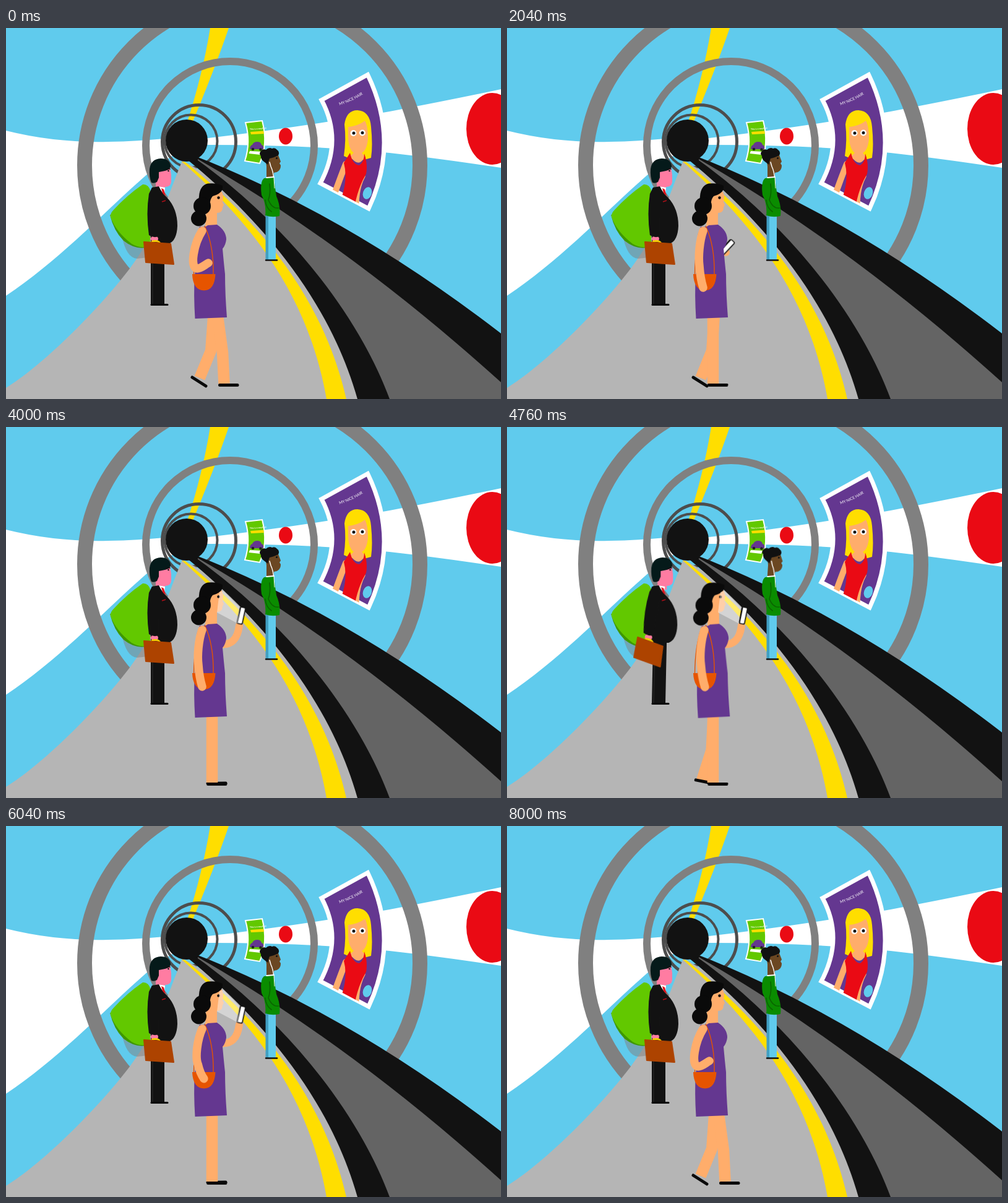
These frames come from a looping animation (800x600 px, 8040 ms). An HTML page:

```html
<!DOCTYPE html>
<html lang="en">
<head>
<meta charset="utf-8">
<title>Waiting on the platform</title>
<style>
  html, body { margin: 0; width: 100%; height: 100%; overflow: hidden; background: #60cbed; }
  svg { display: block; width: 800px; height: 600px; }

  .line { fill: none; stroke-linecap: round; stroke-linejoin: round; }
  .skin { stroke: #ffad6b; }
  .shoe { stroke: #0a0a0a; stroke-width: 5px; }

  /* Idle sway: four full swings per loop */
  .sway { animation: 1005ms cubic-bezier(.455, .03, .515, .955) infinite alternate; }
  .man-head { animation-name: man-head; }
  .man-body { animation-name: man-body; }
  .man-legs { animation-name: man-legs; transform-origin: 245px 447px; }
  .man-arm { animation-name: man-arm; transform-origin: 242px 262px; }
  .man-case { animation-name: man-case; transform-origin: 241px 343px; }
  .lady { animation-name: lady; transform-origin: 330px 250px; }
  .nod { animation-name: nod; animation-duration: 502.5ms; transform-origin: 427px 238px; }
  @keyframes man-head { to { transform: translate(1.5px, 0); } }
  @keyframes man-body { to { transform: translate(-2px, 0); } }
  @keyframes man-legs { to { transform: skewX(-1.4deg); } }
  @keyframes man-arm { to { transform: rotate(9.5deg); } }
  @keyframes man-case { to { transform: rotate(9deg); } }
  @keyframes lady { to { transform: translate(1.5px, .5px) rotate(-.6deg); } }
  @keyframes nod { to { transform: rotate(7deg); } }

  /* One-off actions across the whole loop */
  .act { animation: 8040ms cubic-bezier(.455, .03, .515, .955) infinite; }
  .front-leg { animation-name: front-leg; }
  .front-foot { animation-name: front-foot; }
  .back-leg { animation-name: back-leg; }
  .back-foot { animation-name: back-foot; }
  .near-arm { animation-name: near-arm; }
  .far-arm { animation-name: far-arm; }
  .phone { animation-name: phone; }
  .glow { animation-name: glow; }
  @keyframes front-leg {
    0%, 21%, 93%, 100% { d: path("M342 466 L350 525 L352.5 575"); }
    25%, 85% { d: path("M333 466 L333 525 L333 575"); }
  }
  @keyframes front-foot {
    0%, 21%, 93%, 100% { transform: translate(0, 0); }
    25%, 85% { transform: translate(-19px, -.5px); }
  }
  @keyframes back-leg {
    0%, 25%, 83.3%, 100% { d: path("M335 466 L331 522 L313 566"); }
    37.5%, 50%, 75% { d: path("M333 466 L333 525 L333 575"); }
    62.5% { d: path("M333.5 466 L330 522 L312 571"); }
  }
  @keyframes back-foot {
    0%, 25%, 83.3%, 100% { d: path("M301 565 L323 579"); }
    37.5%, 50%, 75% { d: path("M326 576.5 L355 576"); }
    62.5% { d: path("M302 570 L320 574.5"); }
  }
  @keyframes near-arm {
    0%, 12.5%, 84%, 100% { d: path("M317 328 C304 348 296 388 309 389 C315 389 320 384 327 380"); }
    25%, 70% { d: path("M317 328 C311 345 309 370 311 385 C312 400 314 410 317 420"); }
  }
  @keyframes far-arm {
    0%, 18%, 89.5%, 100% { d: path("M335 345 Q336 370 336 395"); }
    34.2%, 76% { d: path("M345 351 Q373 355 377 321"); }
  }
  @keyframes phone {
    0%, 18%, 89.5%, 100% { transform: translate(337px, 392px) rotate(67deg); }
    34.2%, 76% { transform: translate(380px, 305px) rotate(12deg); }
  }
  @keyframes glow {
    0%, 33%, 77.5%, 100% { opacity: 0; }
    36%, 75.8% { opacity: .42; }
  }
</style>
</head>
<body>
<svg viewBox="0 0 800 600">
  <!-- Walls and ceiling -->
  <rect width="800" height="600" fill="#60cbed"/>
  <path fill="#fff" d="M0 166 Q80 186 165 184 Q220 183 265 178 L285 200 C230 215 125 350 0 433Z"/>
  <path fill="#fff" d="M310 180 Q480 160 620 135 Q720 116 800 99 V226 Q700 211 620 202 Q480 188 310 189Z"/>
  <path fill="#ffde00" d="M330 0 H360 Q336 70 299 158 H291 Q318 75 330 0Z"/>
  <g fill="none" stroke="#808080">
    <circle cx="398" cy="222" r="271" stroke-width="24"/>
    <circle cx="362" cy="190" r="136" stroke-width="12"/>
    <circle cx="312" cy="184" r="59.5" stroke="#4d4d4d" stroke-width="5"/>
    <circle cx="299" cy="183" r="42.5" stroke="#4d4d4d" stroke-width="4"/>
  </g>

  <!-- Platform and track -->
  <path fill="#b5b5b5" d="M285 214 C262 270 246 328 200 389 C150 455 60 545 0 582 V600 H580 L540 480 L400 280Z"/>
  <path fill="#ffde00" d="M284 216 C393 312 488 428 518 600 H550 C510 425 398 305 290 217Z"/>
  <path fill="#121212" d="M292 205 H300 Q550 301 800 494 V600 H568 C520 430 400 300 292 212Z"/>
  <path fill="#646464" d="M310 212 Q555 352 800 573 V600 H620 C560 440 430 300 310 214Z"/>
  <circle cx="292" cy="182" r="34" fill="#121212"/>

  <!-- Bench -->
  <path fill="#808080" fill-opacity=".5" d="M187 335 Q194 372 212 373 L230 371 V345Z"/>
  <path fill="#3f9800" d="M168 302 Q174 328 190 344 Q210 360 231 354 V340Z"/>
  <path fill="#62c800" d="M221 253 Q229 252 233 262 V352 Q218 358 203 349 Q178 330 169 306 Q168 300 174 294 Q196 270 221 253Z"/>

  <!-- Station signs -->
  <ellipse cx="452" cy="175" rx="11" ry="13.5" fill="#ea0a14"/>
  <ellipse cx="786" cy="163" rx="42" ry="58" fill="#ea0a14"/>

  <!-- Small poster -->
  <path fill="#62c800" stroke="#fff" stroke-width="2" d="M387 153 L414 150 Q424 188 410 219 L386 215 Q396 184 387 153Z"/>
  <text x="394" y="165" font-size="3.6" font-weight="700" font-family="Lato, sans-serif" fill="#fff" transform="rotate(-4 394 165)">This is a small ad</text>
  <path fill="#ffde00" d="M395 168 L416 166.5 L417 171 L396 172Z"/>
  <path fill="#643790" d="M394 196 Q394 190 398 189 Q400 184 406 184 Q412 184 413 189 Q417 190 416 196Z"/>
  <circle cx="399" cy="196" r="2.3" fill="#222"/><circle cx="411.5" cy="196.5" r="2.3" fill="#222"/>
  <path fill="#fff" d="M394 199 L413 200 L411 205 L392.5 203Z"/>

  <!-- Large poster -->
  <clipPath id="poster"><path d="M510 116.5 L584.5 75.5 Q637 184 586 292 L508 251 Q545 182 510 116.5Z"/></clipPath>
  <path fill="#643790" stroke="#fff" stroke-width="7" d="M510 116.5 L584.5 75.5 Q637 184 586 292 L508 251 Q545 182 510 116.5Z"/>
  <g clip-path="url(#poster)">
    <path fill="#ffde00" d="M546 207 Q550 180 547 156 Q550 133 568 133 Q588 134 590 160 Q593 190 590 210 Q568 218 546 207Z"/>
    <path class="line skin" stroke-width="10" d="M549 220 Q541 240 531 268"/>
    <path class="line skin" stroke-width="7" d="M577 240 Q568 256 567 285"/>
    <path fill="#ffad6b" d="M553 160 Q570 158 580 150 Q585 158 585 180 Q583 198 575 202 L580 208 Q570 228 556 207 L562 202 Q553 195 553 175Z"/>
    <path fill="#ea0a14" d="M556 202 Q560 221 571 222 Q579 217 579 203 Q585 220 582 236 Q570 256 564 285 H538 Q554 248 546 218Z"/>
    <g fill="#fff"><circle cx="561.5" cy="170" r="5"/><circle cx="576" cy="169.5" r="5"/></g>
    <g fill="#111"><circle cx="562" cy="170" r="2.5"/><circle cx="576" cy="169.5" r="2.5"/></g>
    <ellipse cx="584" cy="267" rx="7" ry="10" fill="#60cbed" transform="rotate(18 584 267)"/>
  </g>
  <path id="arc" fill="none" d="M539 125 Q559 119 579 106"/>
  <text font-size="6.3" font-family="Lato, sans-serif" fill="#fff"><textPath href="#arc">MY NICE HAIR</textPath></text>

  <!-- Young man with earphones -->
  <g>
    <rect x="420" y="300" width="16" height="75" fill="#60cbed"/>
    <path fill="#419fc2" d="M419.5 300 H424 V375 H419.5Z"/>
    <path class="line" stroke="#111" stroke-width="2.5" d="M420 375.5 H438"/>
    <g class="sway nod">
      <path fill="#6b4722" d="M419 208 L439 203 L444 216 L442 219 L444 222 Q444 233 433 234 V242 H421 V224Z"/>
      <path fill="#111" d="M418 217 Q411 212 412 207 Q408 203 412 199 Q415 195 420 197 Q425 192 430 195 Q435 193 438 197 Q443 200 440 206 Q432 210 426 211 Q424 216 423 221Z"/>
      <circle cx="437.5" cy="210.5" r="1.5" fill="#111"/>
      <path class="line" stroke="#fff" stroke-width="1.5" d="M426 217 L428 224 Q432 232 433 246"/>
    </g>
    <path fill="#0a8c00" d="M417 243 L433 241 Q435 259 437 272 Q444 288 442 304 Q430 307 419 303 Q421 285 413 270 Q410 249 417 243Z"/>
    <path class="line" stroke="#0a6500" stroke-width="1.7" d="M426 252 Q428 268 424 278 Q430 293 441 291 M419 278 Q420 291 429 297"/>
    <path class="line" stroke="#fff" stroke-width="1.8" d="M421 242 L433 241"/>
    <path class="line" stroke="#fff" stroke-width="1" d="M433 242 L434 259"/>
  </g>

  <!-- Businessman -->
  <g>
    <g class="sway man-legs">
      <path fill="#121212" d="M234 336 H256 V447 H234Z"/>
      <path fill="none" stroke="#2a2a2a" d="M237 380 V446"/>
    </g>
    <path class="line" stroke="#050505" stroke-width="3" d="M235 447.5 H261"/>
    <g class="sway man-head">
      <path fill="#ff7ca2" d="M242 228 L265 224 L267 238 V249 Q266 257 257 257 V263 H242Z"/>
      <path fill="#051a1a" d="M235 250 Q231 241 232 228 Q234 212 250 211 Q264 211 266 223 Q266 229 257 231 L247 233 V242 L244 249 Q239 252 235 250Z"/>
      <path class="line" stroke="#111" stroke-width="1.5" d="M259 228 H265"/>
      <circle cx="262.5" cy="231" r="1.3" fill="#111"/>
    </g>
    <g class="sway man-body">
      <path fill="#fff" d="M245 256 L257 258 L256 268 L249 264Z"/>
      <path fill="#121212" d="M236 258 L247 256 Q252 267 260 274 Q277 292 277 320 Q276 344 263 349 H235 Q230 310 232 270Z"/>
      <path fill="#e0101a" d="M251 259 L255 261 L258 272 L253 267Z"/>
      <path fill="none" stroke="#b01018" stroke-width="1.5" d="M252 281 L258 279"/>
    </g>
    <g class="sway man-arm">
      <ellipse cx="240" cy="341" rx="6" ry="5" fill="#ff7ca2"/>
      <g class="sway man-case">
        <path class="line" stroke="#f5cc00" stroke-width="3" d="M235 349 Q234 344.5 241 344.5 Q248 344.5 249 349"/>
        <path fill="#ad4300" stroke="#ad4300" stroke-width="2" stroke-linejoin="round" d="M223 346 L266 349 L271 382 L226 379Z"/>
      </g>
      <path fill="#121212" d="M236 258 Q247 256 249 274 L247 337 Q238 340 231 335 Q226 300 231 268Z"/>
    </g>
  </g>

  <!-- Woman -->
  <g>
    <g class="sway lady">
      <path class="line skin act far-arm" stroke-width="12" d="M335 345 Q336 370 336 395"/>
      <g class="act phone">
        <rect x="-4" y="-13.5" width="8.5" height="27" rx="2" fill="#fff" stroke="#111" stroke-width="1.7"/>
        <path fill="none" stroke="#111" stroke-width="2.5" d="M-4 -12 V12"/>
      </g>
    </g>
    <path class="line skin act back-leg" style="stroke-linecap:butt" stroke-width="18" d="M335 466 L331 522 L313 566"/>
    <path class="line shoe act back-foot" d="M301 565 L323 579"/>
    <path class="line skin act front-leg" style="stroke-linecap:butt" stroke-width="18.5" d="M342 466 L350 525 L352.5 575"/>
    <path class="line shoe act front-foot" d="M345.5 577.5 H374"/>

    <g class="sway lady">
      <path fill="#ffad6b" d="M324 280 L346 262 Q351 266 351 274 L350 282 L352 286 L350 290 Q350 299 341 299 V321 H322Z"/>
      <g fill="#0a0a0a">
        <path d="M350 261 Q346 269 334 272 Q328 279 330 292 L316 300 Q310 285 312 272 Q313 255 326 251.5 Q341 250 350 255Z"/>
        <circle cx="317" cy="288" r="14"/>
        <circle cx="311.5" cy="308" r="12.5"/>
        <circle cx="343.5" cy="274.5" r="2.2"/>
      </g>
      <path fill="#643790" d="M313 321 Q322 323 326 319 L341 318 Q356 328 356 342 Q355 351 350 357 Q352 380 354 398 Q354 430 357 468 L305.5 470 Q303 430 305 400 Q311 365 308 335Z"/>
    </g>
    <g fill="none" stroke="#e65400" stroke-width="1.4">
      <path d="M315 324 Q304 352 303.5 399"/>
      <path d="M321 320 Q336 352 335 399"/>
    </g>
    <path fill="#e65400" d="M301 398 H338.5 Q337 424.5 320 424.5 Q302 424 301 398Z"/>
    <g class="sway lady">
      <path class="line skin act near-arm" stroke-width="13.5" d="M317 328 C304 348 296 388 309 389 C315 389 320 384 327 380"/>
    </g>
    <path class="act glow" fill="#fff" opacity="0" d="M345 267 L351 265 L378 292 L375 318 L341 300Z"/>
  </g>
</svg>
</body>
</html>
```
